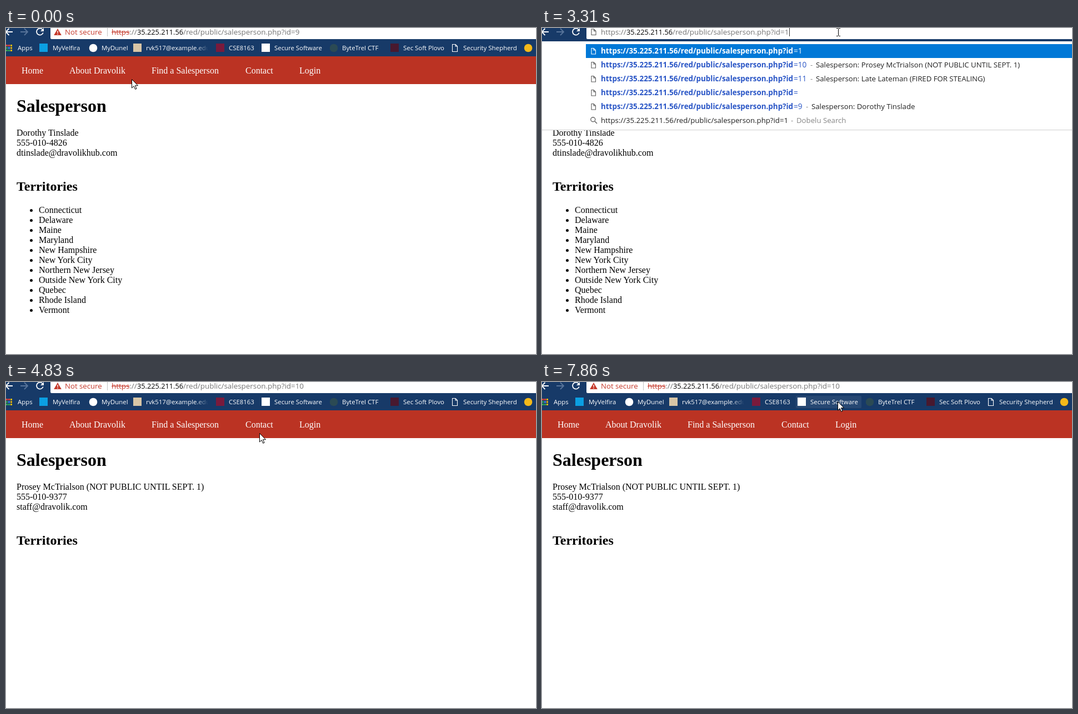
An HTML page for the animation above (8000 ms loop, 954 by 587 pixels).

```html
<!DOCTYPE html>
<html lang="en">
<head>
<meta charset="utf-8">
<title>Salesperson</title>
<style>
html, body { margin: 0; width: 100%; height: 100%; overflow: hidden; background: #fff; }
#stage { position: absolute; left: 0; top: 0; width: 954px; height: 587px; overflow: hidden; background: #fff;
  font: 16px/18px "Liberation Serif", "Times New Roman", serif; color: #000; }
#stage div, #stage svg, .t { position: absolute; }
.t { white-space: pre; }
.ui { font-family: "Open Sans", "Noto Sans", sans-serif; line-height: 20px; font-size: 13.2px; }
#nav { left: 0; top: 51px; width: 954px; height: 50px; background: #bb3323; color: #fff; }
h1, h2, ul { position: absolute; left: 19px; margin: 0; white-space: pre; }
h1 { top: 122px; font-size: 32px; line-height: 36px; }
h2 { top: 272px; font-size: 24px; line-height: 27px; }
ul { top: 319px; padding-left: 40px; }
#sel { top: 180px; height: 18px; background: #3390ff; color: #fff; overflow: hidden; }
#bar { left: 0; top: 0; width: 954px; height: 51px; color: #fff; overflow: hidden; }
#hover { left: 457px; top: 25px; width: 118px; height: 22px; border-radius: 2px; background: rgba(255, 255, 255, .07); }
.mark { font-size: 11.4px; top: 26px; }
.fade { width: 112px; overflow: hidden; -webkit-mask-image: linear-gradient(90deg, #000 80%, transparent); mask-image: linear-gradient(90deg, #000 80%, transparent); }
.url { left: 0; top: -3px; }
.gray { color: #757575; }
.black { color: #000; }
.red { color: #c5392b; }
s { color: #c5392b; }
#urlSel { top: 0; height: 15px; overflow: hidden; background: #0078d7; }
#urlSel * { color: #fff; }
#caret { top: 0; width: 1px; height: 15px; background: #333; }
#drop { left: 0; top: 24px; width: 954px; background: #fff; box-shadow: 0 1px 1px #d6d6d6; overflow: hidden; }
.row { left: 79px; width: 875px; height: 25px; color: #222; }
.row .t { line-height: 24px; top: 0; }
.row b, .row .link { color: #2a56c6; }
.row b { font-size: 13.4px; }
.row .gray { color: #858585; }
.on { background: #0078d7; }
.on .t, .on b, .on .link, .on .gray { color: #fff; }
</style>
</head>
<body>
<div id="stage">
  <div id="nav"></div>
  <h1>Salesperson</h1>
  <div id="info"></div>
  <div id="sel"></div>
  <h2>Territories</h2>
  <ul id="list"></ul>
  <div id="bar" class="ui"></div>
  <div id="hover"></div>
  <div id="urlBox" class="ui"></div>
  <div id="urlSel" class="ui"></div>
  <div id="caret"></div>
  <div id="drop" class="ui"></div>
  <svg id="arrow" width="14" height="21" viewBox="-1 -1 14 21"><path d="M.5 .5V16l3.6-3.4 2.5 5.7 2.4-1-2.5-5.6h5z" fill="#fff" stroke="#000"/></svg>
  <svg id="beam" width="9" height="17" viewBox="-4.5 -8.5 9 17"><path d="M-3.5 -7H-1L0 -6 1 -7H3.5M0 -6V6M-3.5 7H-1L0 6 1 7H3.5" fill="none" stroke="#000"/></svg>
</div>
<script>
const $ = id => document.getElementById(id);
const txt = (x, s, cls = '', css = '') => `<span class="t ${cls}" style="left:${x}px;${css}">${s}</span>`;
const show = (id, on) => { $(id).style.display = on ? '' : 'none'; };

const HOST = '35.225.211.56', PATH = '/red/public/salesperson.php?id=';
const FULL = 'https://' + HOST + PATH;
const PEOPLE = {
  9: { name: 'Dorothy Tinslade', phone: '555-010-4826', mail: 'dtinslade@dravolikhub.com' },
  10: { name: 'Prosey McTrialson (NOT PUBLIC UNTIL SEPT. 1)', phone: '555-010-9377', mail: 'staff@dravolik.com' },
  11: { name: 'Late Lateman (FIRED FOR STEALING)' }
};
const AREAS = ['Connecticut', 'Delaware', 'Maine', 'Maryland', 'New Hampshire', 'New York City',
  'Northern New Jersey', 'Outside New York City', 'Quebec', 'Rhode Island', 'Vermont'];

$('nav').innerHTML = [[28, 'Home'], [114, 'About Dravolik'], [262, 'Find a Salesperson'], [431, 'Contact'], [528, 'Login']]
  .map(([x, s]) => txt(x, s, '', 'top:17px')).join('');
$('list').innerHTML = AREAS.map(a => `<li>${a}</li>`).join('');

const box = (x, c) => `<rect x="${x}" y="28" width="15" height="15" fill="${c}"/>`;
const disc = (x, c) => `<circle cx="${x}" cy="36" r="7.3" fill="${c}"/>`;
const doc = (x, y, w, h, c) => `<path d="M${x} ${y}h${w - 3.5}l3.5 3.5v${h - 3.5}h${-w}zM${x + w - 3.5} ${y}v3.5h3.5" fill="none" stroke="${c}" stroke-width="1.1"/>`;

function toolbar() {
  const tint = ['#ea4335', '#ea4335', '#fbbc05', '#34a853', '#4285f4', '#fbbc05', '#34a853', '#34a853', '#fbbc05'];
  const dots = tint.map((c, i) => `<rect x="${i % 3 * 4}" y="${30 + (i / 3 | 0) * 4.5}" width="3" height="3" fill="${c}"/>`).join('');
  const marks = [[21, 'Apps'], [84, 'MyVelfira'], [172, 'MyDunel'], [401, 'CSE8163'], [483, 'Secure Software'],
    [605, 'ByteTrel CTF'], [715, 'Sec Soft Plovo'], [823, 'Security Shepherd']];
  $('bar').innerHTML = `<svg width="954" height="51">
    <rect width="954" height="51" fill="#173a68"/>
    <rect x="80" y="-10" width="890" height="30" rx="2" fill="#fff"/>
    <g fill="none" stroke-width="1.8">
      <path d="M12 7H0M5.5 1L-.5 7l6 6" stroke="#fff"/>
      <path d="M26 7h13M33 1l6 6-6 6" stroke="#58749a"/>
      <path d="M66 3.2A6 6 0 1 0 66.8 8.5" stroke="#fff"/>
    </g>
    <path d="M68 0v6h-6z" fill="#fff"/>
    ${dots}${box(60, '#0b9fe2')}${disc(157, '#fff')}${box(229, '#d8c6a6')}${box(378, '#7a1a3c')}
    ${box(460, '#fff')}${disc(590, '#2b4a54')}${box(692, '#48192f')}${doc(803.5, 29.5, 9, 13, '#fff')}${disc(940, '#f4b91a')}
  </svg>` + marks.map(([x, s]) => txt(x, s, 'mark')).join('') + txt(252, 'rvk517@example.edu', 'mark fade');
}
toolbar();

const runs = (x, id, safe) =>
  txt(x, safe ? 'https://' : '<s>https</s>://', 'url gray', 'font-size:13.4px') +
  txt(x + 46, HOST, 'url black', 'font-size:12.75px') +
  txt(x + 129, PATH + id, 'url gray', 'font-size:13.4px');

function drawUrl(id, typed) {
  $('urlBox').innerHTML = typed
    ? `<svg width="110" height="20">${doc(89, 2, 8, 10.5, '#5a5a5a')}</svg>` + runs(106, id, true)
    : `<svg width="190" height="20"><path d="M93 1l6.8 12H86.2z" fill="#c5392b"/><path d="M93 5v4M93 10.2v1.6" stroke="#fff" stroke-width="1.4"/><path d="M182.5 0v15" stroke="#c4c4c4"/></svg>` +
      txt(106, 'Not secure', 'url red') + runs(190, id, false);
}

function drawUrlSel(from) {
  const el = $('urlSel');
  show('urlSel', from);
  if (!from) return;
  el.style.left = from + 'px';
  el.style.width = 529 - from + 'px';
  el.innerHTML = `<div style="left:${-from}px;top:0">${runs(190, '9', false)}</div>`;
}

// Suggestion rows: "?" marks the search row, "=" a bare address, else a known person
function row(key, i) {
  const kind = key[0], id = key.replace(/^[?=]/, '');
  let icon = doc(10, 7.5, 7.5, 10.5, i ? '#5a5a5a' : '#fff'), body;
  if (kind === '?') {
    const end = 357 + 8 * id.length;
    icon = '<path d="M16 14l4 4" stroke="#666" stroke-width="1.6"/><circle cx="12.8" cy="10.8" r="4" fill="none" stroke="#666" stroke-width="1.4"/>';
    body = txt(27, FULL + id) + txt(end + 4, '-', 'gray') + txt(end + 14, 'Dobelu Search', 'gray');
  } else {
    const end = 383 + 8 * id.length;
    body = txt(27, `<b>${FULL.slice(0, -1)}</b>`) + txt(374, '=' + id, 'link', 'font-size:13.6px');
    if (kind !== '=') body += txt(end + 5, '-', 'gray') + txt(end + 15, 'Salesperson: ' + PEOPLE[id].name);
  }
  return `<div class="row ${i ? '' : 'on'}" style="top:${5 + 25 * i}px"><svg width="26" height="25">${icon}</svg>${body}</div>`;
}

function drawDrop(keys) {
  show('drop', keys);
  if (!keys) return;
  $('drop').style.height = 9 + 25 * keys.length + 'px';
  $('drop').innerHTML = keys.map(row).join('');
}

function drawPage(id) {
  const p = PEOPLE[id];
  $('info').innerHTML = [p.name, p.phone, p.mail].map((s, i) => txt(19, s, '', `top:${180 + 18 * i}px`)).join('');
  show('list', id === 9);
}

function drawSel(from) {
  const el = $('sel');
  show('sel', from);
  if (!from) return;
  el.style.left = from + 'px';
  el.style.width = 342 - from + 'px';
  el.innerHTML = txt(19 - from, PEOPLE[10].name, '', 'top:0');
}

const first = ['=', '10', '9', '11', '?'];
const wide = ['=1', '10', '11', '=', '9', '?1'];
const narrow = ['10', '?10'];

// Browser state: [time, changes]
const states = [
  [0, { id: '9', typed: false, urlSel: 0, caret: 0, drop: null, page: 9 }],
  [1040, { urlSel: 190 }],
  [1320, { urlSel: 0, caret: 530 }],
  [1470, { urlSel: 521 }],
  [2600, { id: '', typed: true, urlSel: 0, caret: 437, drop: first }],
  [3180, { id: '1', caret: 445, drop: wide }],
  [3460, { id: '10', caret: 452 }],
  [3610, { drop: narrow }],
  [3890, { drop: null, caret: 0 }],
  [4020, { typed: false }],
  [4290, { page: 10 }]
];

// Pointer: [time, x, y, shape, left edge of the text selection]
const A = 'arrow', I = 'beam';
const moves = [
  [0, 226, 92, A], [120, 242, 88, A], [250, 285, 77, A], [380, 348, 60, A], [510, 418, 41, A],
  [640, 480, 24, A], [770, 518, 12, I], [900, 533, 7, I],
  [4430, 523, 20, A], [4560, 503, 43, A], [4700, 477, 71, A], [4830, 456, 92, A], [4950, 408, 143, A], [5190, 352, 182, I],
  [5340, 342, 190, I], [5490, 304, 189, I, 304], [5640, 176, 192, I, 186], [5790, 40, 196, I, 19],
  [5940, 112, 198, I, 98], [6110, 220, 198, I, 206], [6240, 282, 197, I, 274], [6390, 318, 197, I, 312],
  [6540, 246, 195, I, 252], [6690, 112, 194, I, 124], [6840, 32, 195, I, 19], [6990, 122, 194, I, 112],
  [7140, 204, 192, I, 198], [7290, 224, 191, I],
  [7590, 312, 151, A], [7720, 440, 86, A], [7860, 532, 35, A]
];

const at = (table, t) => table.reduce((n, e, i) => e[0] <= t ? i : n, 0);
let lastState = -1, lastMove = -1;

function draw(t) {
  const n = at(states, t), m = at(moves, t);
  if (n !== lastState) {
    const s = Object.assign({}, ...states.slice(0, n + 1).map(e => e[1]));
    drawUrl(s.id, s.typed);
    drawUrlSel(s.urlSel);
    drawDrop(s.drop);
    drawPage(s.page);
    show('caret', s.caret);
    $('caret').style.left = s.caret + 'px';
    lastState = n;
  }
  if (m !== lastMove) {
    const [, x, y, shape, from] = moves[m];
    for (const id of [A, I]) show(id, id === shape);
    $(shape).style.left = x - (shape === I ? 4 : 1) + 'px';
    $(shape).style.top = y - (shape === I ? 8 : 1) + 'px';
    show('hover', x > 457 && x < 575 && y > 25 && y < 47);
    drawSel(from);
    lastMove = m;
  }
}

const start = performance.now();
function tick() {
  draw((performance.now() - start) % 8000);
  requestAnimationFrame(tick);
}
tick();
</script>
</body>
</html>
```
